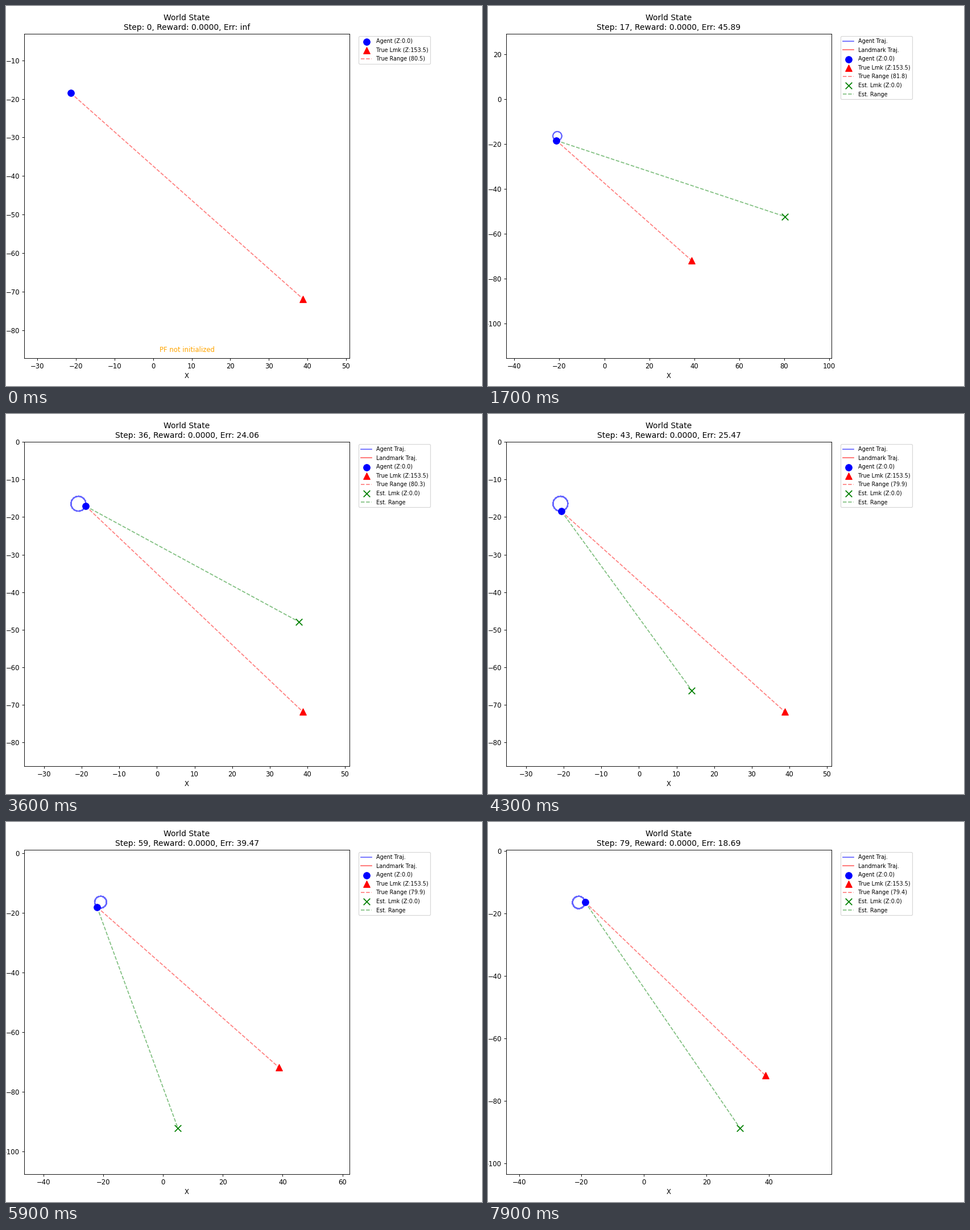
These frames come from a looping animation (837x669 px, 8 s). A matplotlib script:

```python
import numpy as np
import matplotlib.pyplot as plt
from matplotlib.animation import FuncAnimation

W, H, DPI = 837, 669, 83.3
STEPS = 80
LEFT, TOP, SIDE = 32.2, 48.6, 571.6

LMK = np.array([38.85, -71.9])
CENTER, RADIUS = np.array([-20.9, -16.45]), 2.06

# Where the drifting estimate turns: step -> (error, heading in degrees)
TURNS = {9: (19.91, 72.9), 25: (71.88, -22.4), 36: (24.06, 92.7),
         50: (26.88, 241.3), 67: (50.67, 183.6), 79: (18.69, 244.1)}


def polar(size, degrees):
    a = np.radians(degrees)
    return np.column_stack([size * np.cos(a), size * np.sin(a)])


t = np.arange(STEPS)
path = CENTER + polar(RADIUS, -103 + 42.35 * t)
error, heading = (np.interp(t, list(TURNS), track)
                  for track in zip(*TURNS.values()))
estimate = LMK + polar(error, heading)
# The range reading wanders slowly around the plain distance.
reading = np.hypot(*(path - LMK).T) + 1.4 * np.sin(2 * np.pi * t / 86)

fig = plt.figure(figsize=((W + 0.01) / DPI, (H + 0.01) / DPI), dpi=DPI,
                 facecolor="white")
ax = fig.add_axes([LEFT / W, 1 - (TOP + SIDE) / H, SIDE / W, SIDE / H])


def mark(pos, color, shape, label):
    ax.scatter(*pos, c=color, marker=shape, s=100, label=label, zorder=5)


def link(a, b, color, label):
    ax.plot(*zip(a, b), color=color, ls="--", alpha=0.5, label=label)


def trail(points, color, label):
    ax.plot(*points.T, color=color, alpha=0.6, label=label)


def fit_view(points):
    low, high = points.min(axis=0), points.max(axis=0)
    mid, half = (low + high) / 2, 0.7 * (high - low).max()
    ax.set_xlim(mid[0] - half, mid[0] + half)
    ax.set_ylim(mid[1] - half, mid[1] + half)


def draw(step):
    ax.clear()
    agent, est = path[step], estimate[step]
    walked = path[:step + 1]
    tracking = step > 0
    seen = [walked, LMK]

    if tracking:
        trail(walked, "blue", "Agent Traj.")
        trail(np.array([LMK, LMK]), "red", "Landmark Traj.")
    mark(agent, "blue", "o", "Agent (Z:0.0)")
    mark(LMK, "red", "^", "True Lmk (Z:153.5)")
    link(agent, LMK, "red", f"True Range ({reading[step]:.1f})")
    if tracking:
        mark(est, "green", "x", "Est. Lmk (Z:0.0)")
        link(agent, est, "green", "Est. Range")
        seen.append(est)
        err = f"{error[step]:.2f}"
    else:
        ax.text(0.5, 0.02, "PF not initialized", color="orange",
                ha="center", transform=ax.transAxes)
        err = "inf"

    fit_view(np.vstack(seen))
    ax.set_xlabel("X", labelpad=3.3)
    ax.set_title(f"World State\nStep: {step}, Reward: 0.0000, Err: {err}",
                 linespacing=1.28)
    ax.legend(loc="upper left", bbox_to_anchor=(1.02, 1), fontsize="small",
              labelspacing=0.575)
    return []


anim = FuncAnimation(fig, draw, frames=STEPS, init_func=lambda: [],
                     interval=100, repeat=True, repeat_delay=0)
plt.show()
```
